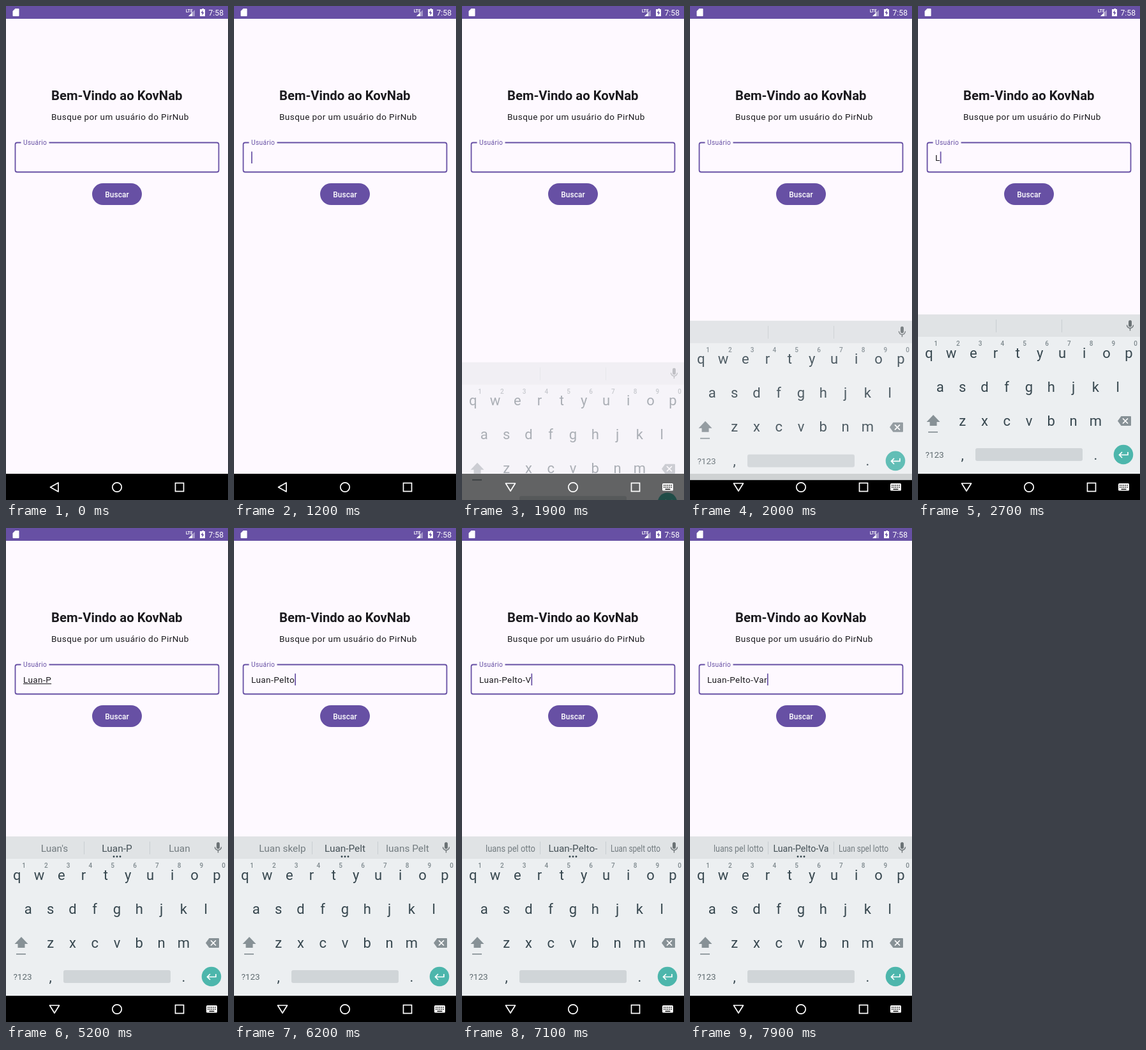
Write an HTML page that moves like this. It is 348 px wide and 772 px high and loops after 8000 ms.

```html
<!DOCTYPE html>
<html lang="pt">
<head>
<meta charset="utf-8">
<style>
  html, body { margin: 0; height: 100%; overflow: hidden; background: #fef9ff; }
  svg { display: block; width: 348px; height: 772px; font-family: Roboto, sans-serif; }
  .mid { text-anchor: middle; }
  .body { font-size: 13.55px; letter-spacing: .42px; fill: #1c1b1f; }
  .key { font-size: 22px; fill: #37474f; }
  .hint { font-size: 10px; font-weight: 500; fill: #7d888d; }
  .word { font-size: 15.4px; fill: #737c80; }
  .line { fill: none; stroke: #fff; stroke-width: 1.7; }
</style>
</head>
<body>
<svg viewBox="0 0 348 772">
  <rect width="348" height="772" fill="#fef9ff"/>

  <!-- status bar -->
  <rect width="348" height="20" fill="#6750a4"/>
  <g fill="#fff">
    <path d="M10.5 8l4-4h5q1 0 1 1v10q0 1-1 1h-8q-1 0-1-1z"/>
    <path d="M296 6v10H286z" opacity=".4"/>
    <path d="M292 10v6H286z"/>
    <text x="282" y="9.5" font-size="6.5" font-weight="700">LTE</text>
    <path d="M306 5h1.5V4h2.500v1h2v11h-8V5z"/>
    <text x="341" y="15" font-size="12.2" text-anchor="end">7:58</text>
  </g>
  <path d="M308.500 6.500l-3 4.500h2v3.500l3-4.500h-2z" fill="#6750a4"/>

  <!-- page -->
  <text x="71" y="147" font-size="20.3" font-weight="700" fill="#1c1b1f">Bem-Vindo ao KovNab</text>
  <text x="71" y="178" class="body">Busque por um usuário do PirNub</text>
  <path d="M23.500 213.500H17.500a3 3 0 0 0-3 3V256.500a3 3 0 0 0 3 3H330.500a3 3 0 0 0 3-3V216.500a3 3 0 0 0-3-3H67.500"
        fill="none" stroke="#6750a4" stroke-width="1.8"/>
  <text x="27" y="217" font-size="10.2" letter-spacing=".34" fill="#6750a4">Usuário</text>
  <text id="typed" x="27" y="242" class="body"></text>
  <rect id="underline" x="27" y="243" height="1" fill="#1c1b1f"/>
  <rect id="cursor" y="227.500" width="1.7" height="18.500" fill="#6750a4"/>
  <rect x="135" y="277" width="78" height="34" rx="17" fill="#6750a4"/>
  <text x="174" y="299" class="mid" font-size="11.9" font-weight="500" letter-spacing=".08" fill="#fff">Buscar</text>

  <rect y="731" width="348" height="41"/>

  <g id="keyboard">
    <rect y="482" width="348" height="249" fill="#eceff1"/>
    <rect y="482" width="348" height="35" fill="#e0e3e5"/>
    <path d="M122.500 490v20M225.500 490v20" stroke="#c9ced1"/>
    <g id="words">
      <text class="word mid"></text>
      <text class="word mid" style="fill:#455157"></text>
      <text class="word mid"></text>
    </g>
    <g id="dots" fill="#37474f">
      <circle cx="169" cy="513.500" r="1.4"/><circle cx="174" cy="513.500" r="1.4"/><circle cx="179" cy="513.500" r="1.4"/>
    </g>
    <g fill="#6b7275">
      <rect x="330" y="491" width="5" height="10.500" rx="2.500"/>
      <path d="M327.500 498.500a5 5 0 0 0 10 0M332.500 503.500v4" fill="none" stroke="#6b7275" stroke-width="1.4"/>
    </g>
    <g id="keys"></g>
    <g fill="#879196">
      <path d="M24 639l10.500 11H29.500v6h-11v-6h-5z"/>
      <rect x="16" y="665" width="15" height="1.700"/>
      <path d="M318.500 641H333q1 0 1 1v13q0 1-1 1H318.500l-5.500-7.500z"/>
    </g>
    <path d="M321 644.500l8 8m0-8l-8 8" class="line"/>
    <text x="26" y="706" class="mid" font-size="13.500" fill="#5f6b70">?123</text>
    <rect x="90" y="691" width="168" height="20" rx="3" fill="#d0d5d8"/>
    <circle cx="322" cy="701" r="15.300" fill="#4db6ac"/>
    <path d="M329 697v4.500H315.500m4.500-4.500l-4.500 4.500l4.500 4.500" class="line"/>
  </g>

  <!-- navigation bar -->
  <circle cx="174" cy="752" r="7.200" class="line"/>
  <rect x="265.500" y="745.500" width="13" height="13" class="line"/>
  <path id="back" class="line" stroke-linejoin="round"/>
  <g id="switcher">
    <rect x="314" y="746" width="17" height="11.500" rx="1.500" fill="#fff"/>
    <path d="M316 749h13M316 752h13" stroke="#000" stroke-width="1.500" stroke-dasharray="1.500 1.300"/>
    <path d="M318.500 755.200h8" stroke="#000" stroke-width="1.400"/>
  </g>
</svg>
<script>
const $ = id => document.getElementById(id);
const LOOP = 8000, STEP = 100, NAME = 'Luan-Pelto-Var';
const KEYBOARD_START = 1810;

// [time, letters typed, underlined, suggestions if they change]
const EVENTS = [
  [0, 0, 0, ['', '', '']],
  [2700, 1, 0], [2800, 1, 1, ['La', 'L', 'Lado']],
  [3000, 2, 0], [3100, 2, 1, ['Lr', 'Lu', 'Lunada']],
  [3500, 3, 0], [3600, 3, 1],
  [3800, 4, 0], [3900, 4, 1, ['Luar', 'Luan', 'Luanas']],
  [4200, 5, 0], [4300, 5, 1], [4400, 5, 1, ["Luan's", 'Luan-', 'Luans']],
  [4700, 6, 0], [4800, 6, 1, ["Luan's", 'Luan-P', 'Luan']],
  [5300, 7, 0], [5400, 8, 0], [5600, 8, 1, ['Luan perp', 'Luan-Pel', 'luans pelt']],
  [5900, 9, 0], [6000, 9, 1, ['Luan skelp', 'Luan-Pelt', 'luans Pelt']],
  [6200, 10, 0], [6300, 10, 1, ['luans pelo', 'Luan-Pelto', 'Luan pelto']],
  [6700, 11, 0], [6800, 11, 1, ['luans pel otto', 'Luan-Pelto-', 'Luan spelt otto']],
  [7100, 12, 0], [7200, 12, 1, ['luans pel otto', 'Luan-Pelto-V', 'Luan spelt o']],
  [7500, 13, 0], [7600, 13, 1, ['luans pel lotto', 'Luan-Pelto-Va', 'Luan spel lotto']],
  [7900, 14, 0],
];

const label = (text, x, y, kind) => `<text x="${x}" y="${y}" class="mid ${kind}">${text}</text>`;
const row = (text, x, y, kind = 'key') =>
  [...text].map((c, i) => label(c, x + i * 34.8, y, kind)).join('');

$('keys').innerHTML =
  row('qwertyuiop', 17.2, 549.5) + row('1234567890', 28, 531, 'hint') +
  row('asdfghjkl', 34.8, 602.5) + row('zxcvbnm', 69.6, 655.5) +
  label(',', 69.6, 708.5, 'key') + label('.', 278.4, 708.5, 'key');

const show = (id, on) => $(id).setAttribute('visibility', on ? 'visible' : 'hidden');

function drawKeyboard(t) {
  const age = t - KEYBOARD_START, open = age > -STEP;
  const slide = 185 * Math.max(0, 1 - age / 247) ** 2;
  $('keyboard').setAttribute('opacity', Math.min(1, Math.max(0, age / 216)));
  $('keyboard').setAttribute('transform', `translate(0 ${slide})`);
  $('back').setAttribute('d', open ? 'M68.500 746h15l-7.500 12z' : 'M69.500 752l12.500-7v14z');
  show('switcher', open);
}

function drawWords(words) {
  [...$('words').children].forEach((node, i) => {
    node.textContent = words[i];
    // long suggestions are condensed to their column
    const squeeze = Math.min(1, (i === 1 ? 87 : 78) / (node.getComputedTextLength() || 1));
    node.setAttribute('transform', `translate(${76 + i * 98} 506) scale(${squeeze} 1)`);
  });
  show('dots', words[1]);
}

function draw(t) {
  const past = EVENTS.filter(e => e[0] <= t);
  const [, count, underlined] = past.at(-1);
  const lastKey = count ? past.find(e => e[1] === count)[0] : 200;

  $('typed').textContent = NAME.slice(0, count);
  const width = count ? $('typed').getComputedTextLength() : 0;
  $('underline').setAttribute('width', width);
  show('underline', underlined);
  $('cursor').setAttribute('x', 27 + width);
  show('cursor', (t - lastKey + 1000) % 1000 < 500);

  drawWords(past.findLast(e => e[3])[3]);
  drawKeyboard(t);
}

let shown = -1;
function tick() {
  const t = Math.floor(performance.now() % LOOP / STEP) * STEP;
  if (t !== shown) draw(shown = t);
  requestAnimationFrame(tick);
}
tick();
</script>
</body>
</html>
```
